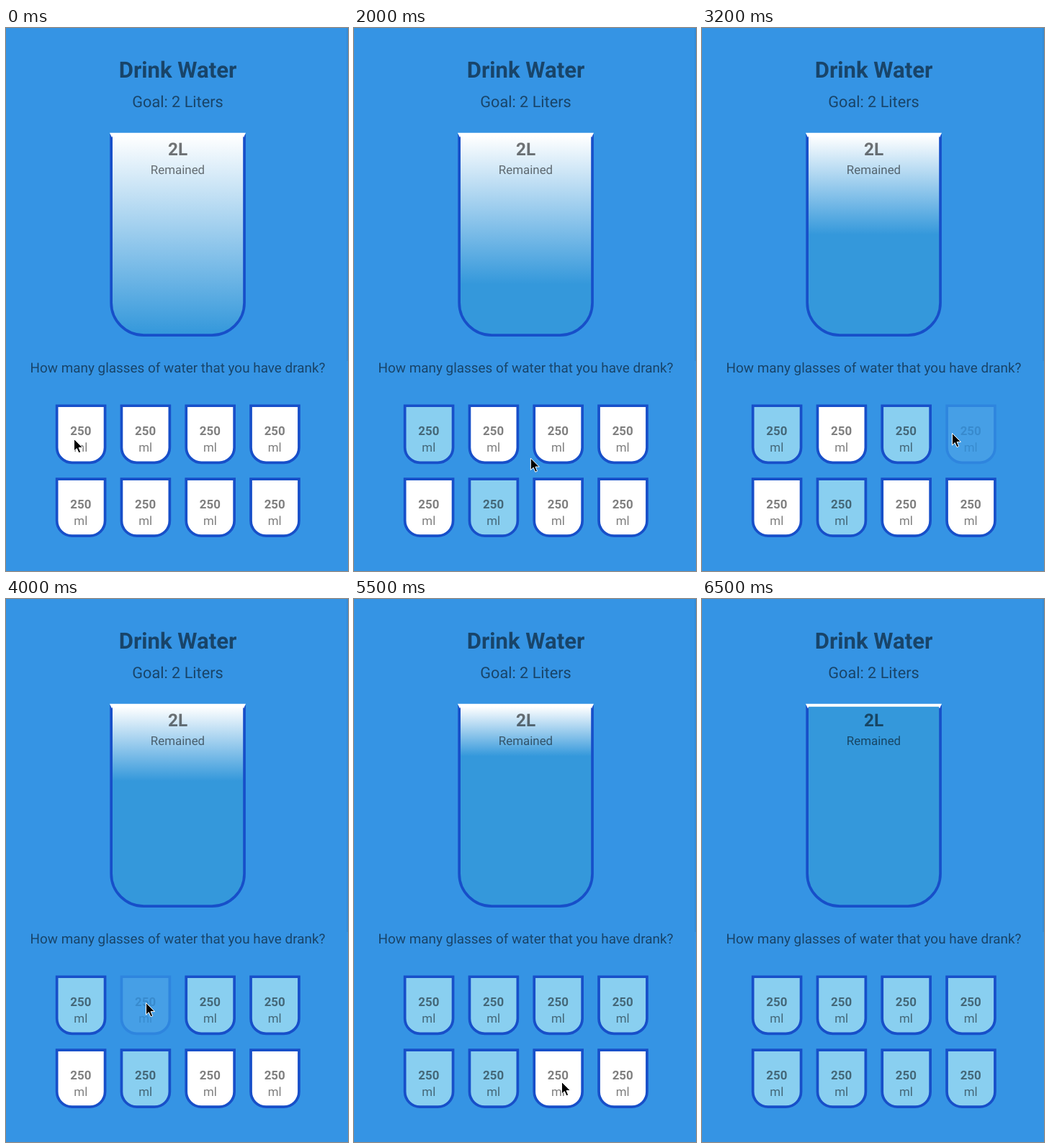
An HTML page for the animation above (7700 ms loop, 475 by 755 pixels).

```html
<!DOCTYPE html>
<html lang="en">
<head>
<meta charset="utf-8">
<title>Drink Water</title>
<style>
  html, body { margin: 0; width: 100%; height: 100%; overflow: hidden; background: #3594e4; }
  svg { display: block; width: 475px; height: 755px; }
  text {
    font-family: Roboto, sans-serif;
    text-anchor: middle;
    text-rendering: geometricPrecision;
    fill: rgba(0, 0, 0, .54);
  }
  #glasses text { fill: rgba(0, 0, 0, .5); }
  .bold { font-weight: 700; }
  .rim { stroke: #174fc9; stroke-width: 3.7; }
</style>
</head>
<body>
<svg viewBox="0 0 475 755">
  <defs>
    <linearGradient id="water" gradientUnits="userSpaceOnUse" x1="0" x2="0" y1="149.7" y2="425.3">
      <stop offset="0" stop-color="#fff"/>
      <stop offset="1" stop-color="#3498db"/>
    </linearGradient>
  </defs>
  <rect width="475" height="755" fill="#3594e4"/>
  <rect x="473" width="2" height="463" fill="rgba(0,0,0,.05)"/>
  <text class="bold" x="238.5" y="69.4" font-size="31.1">Drink Water</text>
  <text x="238.5" y="109.8" font-size="21.7">Goal: 2 Liters</text>
  <g id="cup"></g>
  <polygon fill="#fff" points="144,145.7 333,145.7 330,152.3 328.8,149.7 148.2,149.7 147,152.3"/>
  <text class="bold" x="238.5" y="176.7" font-size="24.4">2L</text>
  <text x="238.5" y="203" font-size="16.9">Remained</text>
  <text x="238.5" y="478.6" font-size="18.9">How many glasses of water that you have drank?</text>
  <g id="glasses"></g>
  <path id="cursor" d="M.5 1.5v16.6l3.8-3.5 2.7 6.2 2.7-1.2-2.6-6h5.4z"
        fill="#000" stroke="#fff" stroke-linejoin="round"/>
</svg>
<script>
const LOOP = 7700, STEP = 100;
const TOP = 149.7, DEPTH = 275.6;                      // water area of the cup
const LEFT = 104.1, ROW = 523.4, DX = 89.8, DY = 101.8; // grid of glasses
const HOLD = 2, TRAVEL = 5, POINTER_GONE = 65;         // in steps

// Each tap: [step, pointer x, pointer y]
const taps = [
  [5, 94, 570], [17, 183, 655], [26, 275, 568], [31, 347, 562],
  [39, 194, 560], [47, 86, 685], [57, 288, 670], [61, 381, 682]
];

const $ = id => document.getElementById(id);
const easeOut = u => 1 - (1 - u) ** 5;
const clamp = u => Math.min(1, Math.max(0, u));

function add(parent, name, attrs, label) {
  const el = document.createElementNS("http://www.w3.org/2000/svg", name);
  for (const key in attrs) el.setAttribute(key, attrs[key]);
  if (label) el.textContent = label;
  return parent.appendChild(el);
}

// Square top, round bottom; the box is the outer edge of the rim.
function vessel(parent, x, y, w, h, r, fill, open) {
  const i = 1.85, l = x + i, t = y + i, R = x + w - i, b = y + h - i, c = r - i;
  const d = `M${R} ${t}V${b - c}A${c} ${c} 0 0 1 ${R - c} ${b}` +
    `H${l + c}A${c} ${c} 0 0 1 ${l} ${b - c}V${t}${open ? "" : "Z"}`;
  return add(parent, "path", { class: "rim", fill, d });
}

vessel($("cup"), 144.3, 146, 188.6, 283, 47, "url(#water)", true);

const glasses = Array.from({ length: 8 }, (_, i) => {
  const cx = LEFT + (i % 4) * DX, y = ROW + (i >> 2) * DY;
  const group = add($("glasses"), "g", {});
  const body = vessel(group, cx - 35.3, y, 70.6, 82.8, 23, "#fff");
  add(group, "text", { class: "bold", x: cx - .3, y: y + 43, "font-size": 16.9 }, "250");
  add(group, "text", { x: cx - .3, y: y + 66, "font-size": 16.9 }, "ml");
  return { group, body };
});

const glassAt = (x, y) => glasses[Math.round((x - LEFT) / DX) + (y > ROW + DY - 10 ? 4 : 0)];

// Fades down in one step, then back up.
const pressed = age => age < 0 ? 1 : age < 1 ? .5 : Math.min(1, .2 + .4 * (age - 1));

// Rests after a tap, then glides to the next one.
function pointerAt(step) {
  const last = taps.findLastIndex(tap => tap[0] <= step);
  const [s0, x0, y0] = taps[Math.max(0, last)];
  const [s1, x1, y1] = taps[Math.min(taps.length - 1, last + 1)];
  const time = Math.min(TRAVEL, s1 - s0 - HOLD);
  const u = time > 0 ? easeOut(clamp((step - s0 - HOLD) / time)) : 0;
  return [x0 + (x1 - x0) * u, y0 + (y1 - y0) * u];
}

function draw(step) {
  let drunk = 0;
  for (const [start, x, y] of taps) {
    const { group, body } = glassAt(x, y);
    const full = step > start;
    if (full) drunk++;
    body.setAttribute("fill", full ? "#89cff0" : "#fff");
    group.setAttribute("opacity", pressed(step - start));
  }
  $("water").setAttribute("y2", TOP + DEPTH * (1 - drunk / taps.length));
  $("cursor").setAttribute("transform", `translate(${pointerAt(step)})`);
  $("cursor").setAttribute("visibility", step < POINTER_GONE ? "visible" : "hidden");
}

const begin = performance.now();
function tick() {
  draw(Math.floor(((performance.now() - begin) % LOOP) / STEP));
  requestAnimationFrame(tick);
}
tick();
</script>
</body>
</html>
```
